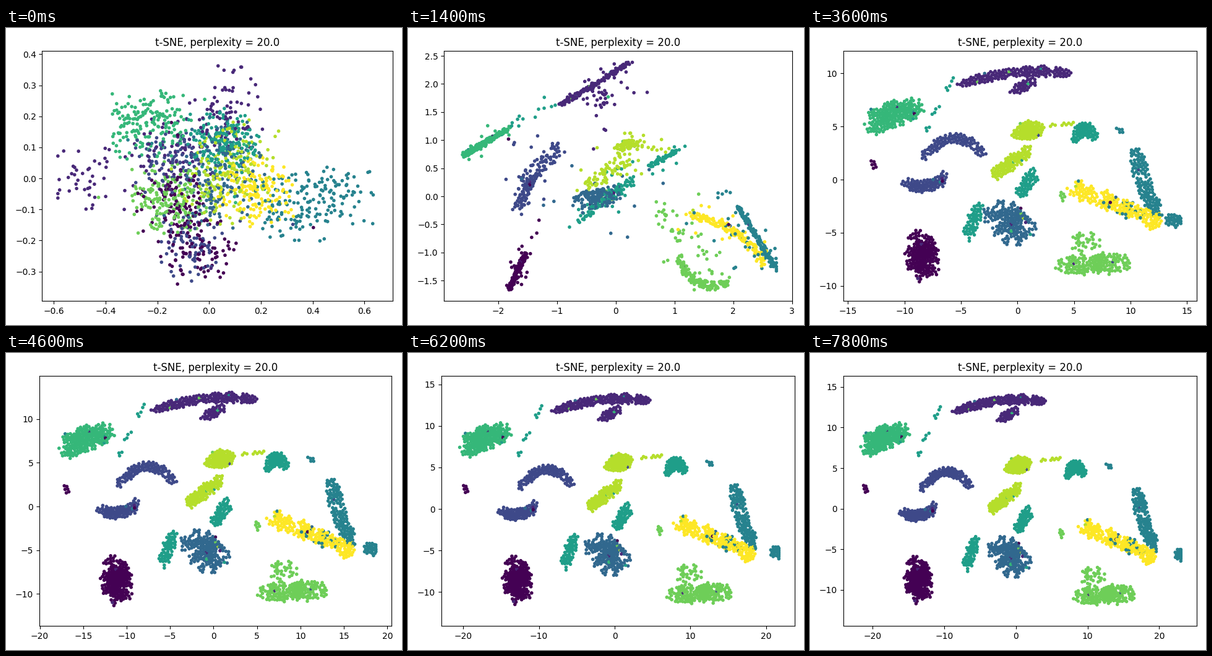
These frames come from a looping animation (640 px wide and 480 px high, 8000 ms). A matplotlib script:

```python
import numpy as np
import matplotlib.pyplot as plt
from matplotlib.animation import FuncAnimation

rng = np.random.default_rng(20)
FRAMES = 40

# Key times and the axis limits (x0, x1, y0, y1) at each
KEYS = np.array([0, 7, 13, 18, 23, 31, 39])
LIMITS = np.array([
    [-0.6456, 0.709, -0.395, 0.410],
    [-2.926, 3.001, -1.863, 2.585],
    [-10.53, 10.93, -7.81, 8.27],
    [-15.41, 15.87, -11.43, 12.10],
    [-20.04, 20.50, -13.69, 14.93],
    [-22.88, 23.77, -14.10, 16.00],
    [-24.10, 25.24, -14.46, 16.34],
])
LEFT, RIGHT, TOP, BOTTOM = 54, 625, 37.5, 441

# Stage positions are complex numbers, x + y*j in pixels.
# Each class starts as soft blobs around these places.
START = [
    [270 + 278j, 305 + 358j],
    [370 + 112j, 130 + 247j, 250 + 207j, 345 + 165j],
    [270 + 210j, 297 + 348j],
    [345 + 198j, 335 + 265j],
    [455 + 292j, 485 + 293j, 530 + 270j],
    [350 + 185j],
    [230 + 157j],
    [262 + 278j],
    [330 + 265j, 372 + 205j],
    [400 + 260j],
]


def stretch(z, sx, sy):
    return sx * z.real + 1j * sy * z.imag


def arc(arm, bend, s):
    """Bowed stroke about zero for s in -1..1."""
    return arm * (s + 1j * bend * (1 - s ** 2))


def relax(p, gap=4.7, steps=14):
    """Push points apart until they sit about one gap from each other."""
    for _ in range(steps):
        d = p[:, None] - p
        r = np.abs(d) + 1e-6
        p = p + 0.3 * (d * np.clip(gap - r, 0, None) / r).sum(1)
    return p


def gather(p, pull=0.35):
    """Draw points a little towards the nearest of a few seeds."""
    seeds = p[:: 5]
    near = seeds[np.abs(p[:, None] - seeds).argmin(1)]
    return p + pull * (near - p)


def drift(z):
    """How far a group at z wanders while the map settles."""
    u, v = (z.real - 335) / 285, (z.imag - 240) / 200
    return (-8 + 6 * u + 22 * v + 25 * u * v
            + 1j * (18 + 12 * u - 14 * u ** 2 - 22 * v ** 2))


poses, labels = [], []


def cluster(label, n, at, arm, wide, strip_at, strip_arm,
            bend=0, strip_bend=0, fuzz=4):
    """A blob that turns into a thin strip and opens into a bowed stroke."""
    s = np.linspace(-1, 1, n) + rng.normal(0, 0.04, n)
    disc = np.sqrt(rng.random(n)) * np.exp(2j * np.pi * rng.random(n))
    shape = relax(gather(arc(arm, bend, s) + wide * disc))

    home = rng.choice(START[label], n)
    soft = rng.triangular(-2.4, 0, 2.4, (2, n))
    blob = home + 29 * soft[0] + 26j * soft[1]
    loose = np.where(rng.random(n) < 0.13, rng.uniform(2, 7, n), 1)
    strip = strip_at + arc(strip_arm, strip_bend, s) + fuzz * loose * disc

    opened = at + shape
    final = at + drift(complex(at)) + stretch(shape, 0.82, 0.92)
    step = final - opened
    poses.append(np.array([blob, strip, at + stretch(shape, 1.12, 1.02), opened,
                           opened + 0.37 * step, opened + 0.74 * step, final]))
    labels.extend([label] * n)


# Left and top
cluster(6, 180, 135 + 140j, 38 - 13j, 20, 123 + 184j, 37 - 22j)
cluster(5, 12, 210 + 125j, 25 - 45j, 6, 200 + 142j, 40 - 18j, fuzz=10)
cluster(1, 145, 333 + 82j, 86 - 9j, 4, 302 + 90j, 55 - 33j, bend=-0.12)
cluster(1, 35, 345 + 92j, 18 - 8j, 7, 310 + 112j, 20 + 5j, fuzz=17)

# Indigo arcs
cluster(2, 95, 233 + 208j, 50 - 2j, 5, 212 + 223j, 32 - 32j, bend=-0.6, fuzz=14)
cluster(2, 80, 187 + 245j, 33 - 6j, 6, 188 + 266j, 12 - 22j, bend=0.3, fuzz=8)

# Lower left and centre
cluster(0, 175, 180 + 367j, 5 + 20j, 27, 174 + 393j, 13 - 28j)
cluster(0, 6, 103 + 221j, 1 + 4j, 1, 190 + 345j, 20 - 30j, fuzz=6)
cluster(3, 170, 323 + 316j, 14 + 12j, 30, 305 + 275j, 25 - 5j, fuzz=16)
cluster(5, 48, 352 + 252j, 12 - 14j, 11, 345 + 260j, 20 - 12j, fuzz=9)
cluster(5, 52, 264 + 312j, -8 + 26j, 9, 302 + 290j, 28 - 22j, fuzz=6)

# Lime chain and teal hook
cluster(8, 85, 353 + 165j, 17 - 4j, 10, 356 + 188j, 16 - 4j, fuzz=8)
cluster(8, 85, 325 + 218j, 26 - 22j, 9, 320 + 235j, 32 - 25j, fuzz=13)
cluster(8, 9, 410 + 155j, 22 - 2j, 2, 400 + 194j, 24 + 4j)
cluster(5, 60, 445 + 180j, 15 - 2j, 4, 415 + 210j, 22 - 13j, bend=-1.2)

# Right side
cluster(4, 120, 545 + 250j, 18 + 52j, 13, 566 + 336j, 31 + 50j, bend=0.1)
cluster(4, 28, 588 + 310j, 9 + 2j, 5, 585 + 370j, 12 + 15j)
cluster(4, 20, 512 + 288j, 26 + 12j, 20, 540 + 335j, 25 + 30j, fuzz=12)
cluster(4, 5, 502 + 166j, 3 + 2j, 1, 510 + 266j, 15 + 2j)
cluster(9, 175, 495 + 286j, 70 + 28j, 14, 520 + 340j, 60 + 37j, strip_bend=-0.2, fuzz=6)
cluster(7, 150, 458 + 382j, 52 - 4j, 17, 480 + 390j, 42 + 20j, strip_bend=0.5, fuzz=7)
cluster(7, 32, 448 + 347j, 15 - 2j, 18, 455 + 335j, 38 + 28j, fuzz=20)
cluster(7, 6, 408 + 272j, 1 + 4j, 2, 415 + 303j, 3 + 5j)

px = np.concatenate(poses, axis=1)
cls = np.array(labels)
order = rng.permutation(len(cls))
px, cls = px[:, order], cls[order]
stray = rng.random(len(cls)) < 0.025
cls[stray] = rng.integers(0, 10, stray.sum())

# Places as fractions of the axes box
frac = np.stack([(px.real - LEFT) / (RIGHT - LEFT),
                 (BOTTOM - px.imag) / (BOTTOM - TOP)], axis=-1)
frac = np.clip(frac, 0.045, 0.955)


def smooth(y):
    """Monotone cubic through the key poses, sampled at every frame."""
    col = (-1,) + (1,) * (y.ndim - 1)
    h = np.diff(KEYS).astype(float)
    d = np.diff(y, axis=0) / h.reshape(col)
    a, b = d[:-1], d[1:]
    same = a * b > 0
    mid = np.where(same, 2 * a * b / np.where(same, a + b, 1), 0)
    m = np.concatenate([d[:1], mid, d[-1:]])
    f = np.arange(FRAMES)
    i = np.clip(np.searchsorted(KEYS, f, side="right") - 1, 0, len(h) - 1)
    s = ((f - KEYS[i]) / h[i]).reshape(col)
    w = h[i].reshape(col)
    return ((1 + 2 * s) * (1 - s) ** 2 * y[i] + s * (1 - s) ** 2 * w * m[i]
            + s ** 2 * (3 - 2 * s) * y[i + 1] + s ** 2 * (s - 1) * w * m[i + 1])


track = smooth(frac)
limits = smooth(LIMITS)

fig, ax = plt.subplots(figsize=(6.4, 4.8), dpi=100)
ax.set_title("t-SNE, perplexity = 20.0")
dots = ax.scatter(track[0, :, 0], track[0, :, 1], c=cls, s=9, cmap="viridis",
                  vmin=0, vmax=9)


def draw(i):
    x0, x1, y0, y1 = limits[i]
    dots.set_offsets(track[i] * (x1 - x0, y1 - y0) + (x0, y0))
    ax.set_xlim(x0, x1)
    ax.set_ylim(y0, y1)
    fig.tight_layout()
    return (dots,)


anim = FuncAnimation(fig, draw, frames=FRAMES, interval=200, repeat=True,
                     repeat_delay=0, init_func=lambda: draw(0))
plt.show()
```
